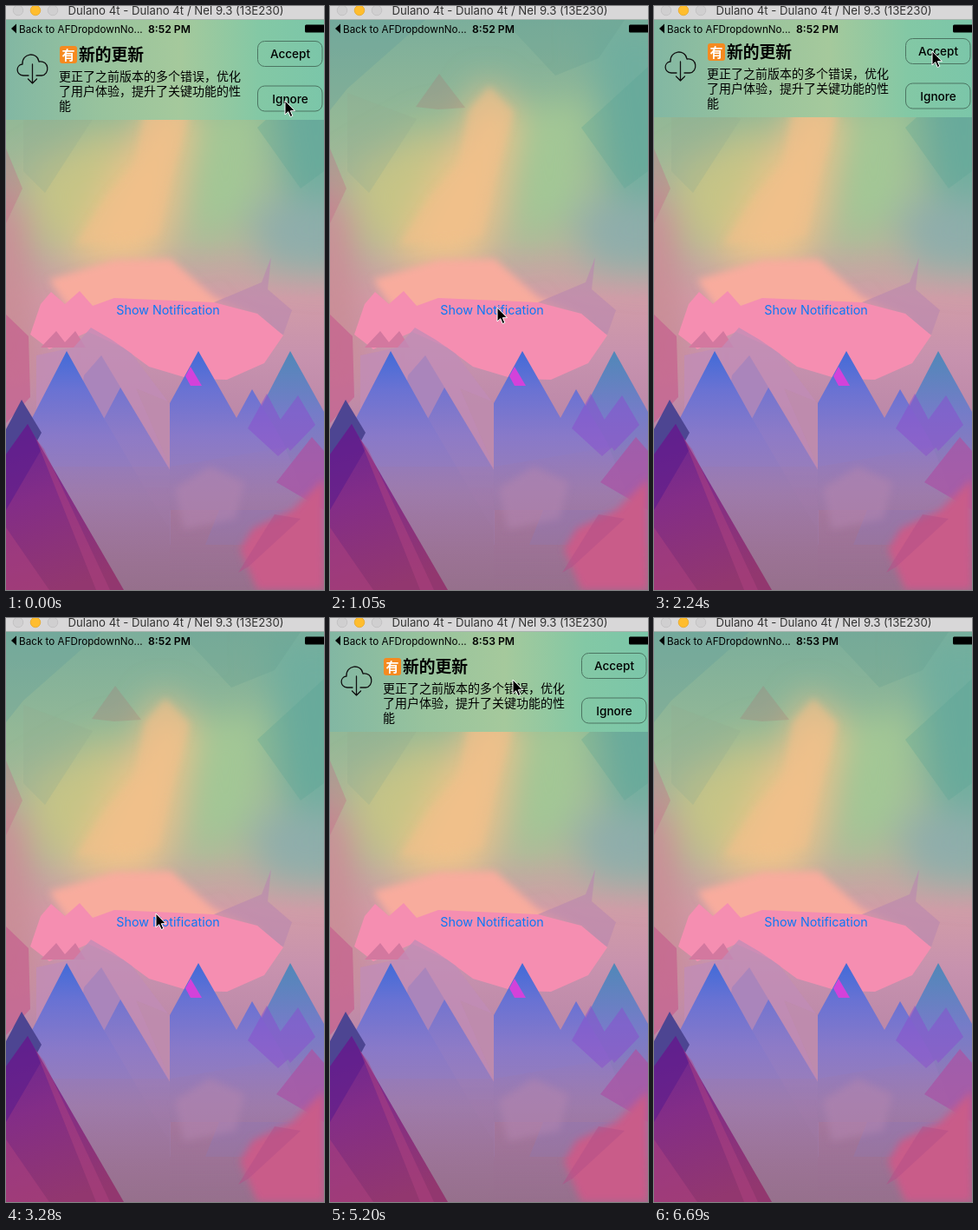
Recreate the animation shown at these times as an HTML page. Size 367x672 px, loop 6.84 s.

```html
<!DOCTYPE html>
<html lang="en">
<head>
<meta charset="utf-8">
<title>Dropdown notification</title>
<style>
  html, body { margin: 0; width: 100%; height: 100%; overflow: hidden; background: #b58fae; }
  svg { display: block; width: 100%; height: 100%; }
  text { font-family: Inter, Roboto, sans-serif; }
  .cjk { font-family: "Noto Sans CJK SC", "Noto Sans CJK", sans-serif; }
  .mid { text-anchor: middle; }
</style>
</head>
<body>
<svg viewBox="0 0 367 672">
  <defs>
    <linearGradient id="sky" x2="0" y2="1">
      <stop offset="0" stop-color="#78ad9c"/>
      <stop offset=".2" stop-color="#94b896"/>
      <stop offset=".4" stop-color="#b5b59b"/>
      <stop offset=".5" stop-color="#d19ca7"/>
      <stop offset=".6" stop-color="#c792ae"/>
      <stop offset="1" stop-color="#9b6c98"/>
    </linearGradient>
    <linearGradient id="peak" gradientUnits="userSpaceOnUse" x1="0" y1="397" x2="0" y2="640">
      <stop offset="0" stop-color="#416bd8"/>
      <stop offset=".18" stop-color="#6972d3"/>
      <stop offset=".4" stop-color="#8879c9"/>
      <stop offset=".68" stop-color="#9d7eb3"/>
      <stop offset="1" stop-color="#a1759c"/>
    </linearGradient>
    <linearGradient id="tealPeak" gradientUnits="userSpaceOnUse" x1="0" y1="397" x2="0" y2="540">
      <stop offset="0" stop-color="#5088b8"/>
      <stop offset=".5" stop-color="#757cc8"/>
      <stop offset="1" stop-color="#9379b8"/>
    </linearGradient>
    <linearGradient id="purple" gradientUnits="userSpaceOnUse" x1="0" y1="482" x2="60" y2="672">
      <stop offset="0" stop-color="#662693"/>
      <stop offset=".45" stop-color="#832d87"/>
      <stop offset="1" stop-color="#92376f"/>
    </linearGradient>
    <linearGradient id="haze" x2="0" y2="1">
      <stop offset="0" stop-color="#a478a5" stop-opacity="0"/>
      <stop offset="1" stop-color="#96708c"/>
    </linearGradient>
    <linearGradient id="glass">
      <stop offset="0" stop-color="#82b7a3"/>
      <stop offset=".3" stop-color="#98c39d"/>
      <stop offset=".55" stop-color="#a5c99c"/>
      <stop offset=".8" stop-color="#83c8a5"/>
      <stop offset="1" stop-color="#7bc6a9"/>
    </linearGradient>
    <filter id="soft" x="-50%" y="-50%" width="200%" height="200%"><feGaussianBlur stdDeviation="20"/></filter>
    <filter id="edge" x="-20%" y="-20%" width="140%" height="140%"><feGaussianBlur stdDeviation="4"/></filter>
    <clipPath id="screen"><rect y="16" width="367" height="656"/></clipPath>
  </defs>

  <g clip-path="url(#screen)">
    <!-- sky -->
    <rect width="367" height="672" fill="url(#sky)"/>
    <g filter="url(#soft)">
      <path fill="#70ae9f" d="M300 20H400V300L330 270Z"/>
      <path fill="#a3c795" d="M215 120L300 110 290 230 215 280Z"/>
      <path fill="#c6c486" d="M25 190L130 130 130 270 40 270Z"/>
      <path fill="#f3c38a" d="M180 85L215 130 195 240 170 300H70L110 230Z"/>
      <path fill="#c98d96" d="M-30 190L25 240 40 440H-30Z"/>
      <path fill="#8fadab" d="M280 230L390 220V310L300 300Z"/>
    </g>
    <g filter="url(#edge)">
      <path fill="#f1bf8a" opacity=".6" d="M184 92L212 122 190 200 175 265 80 275 115 220 150 180 160 120Z"/>
      <path fill="#f8ac9d" d="M50 315L125 292 190 291 240 335 300 362 180 365 70 345Z"/>
    </g>
    <g opacity=".28">
      <path fill="#a87878" d="M99 116L126 78 156 117 125 119Z"/>
      <path fill="#c65b86" d="M0 164L19 210 0 250Z"/>
      <path fill="#5f9c9b" d="M0 16H110L20 95 0 120Z"/>
      <path fill="#659f90" d="M200 16L260 80 310 60 340 16Z"/>
      <path fill="#56a392" d="M367 70L290 140 340 210 367 190Z"/>
      <path fill="#93ac90" d="M20 100L100 130 45 215 20 190Z"/>
    </g>
    <path fill="#b987b0" opacity=".6" d="M228 346L295 318 306 289 302 326 330 350 320 378Z"/>
    <path fill="#f58eb1" d="M28 378L40 343 52 329 68 343 85 328 100 345 125 336 240 341 290 354 320 379 298 411 255 430 212 429 165 415 135 393 95 375 50 395Z"/>
    <path fill="#c6638f" opacity=".75" d="M0 355L26 380 28 450 0 480Z"/>
    <path fill="#d3789f" d="M40 393L58 374 68 387 80 374 92 393Z"/>
    <path fill="#c18db7" opacity=".75" d="M78 393L98 370 122 384 145 400 189 458V540H35V402Z"/>

    <!-- mountains -->
    <path fill="#a484bd" opacity=".8" d="M90 425L110 402 190 535V620H60Z"/>
    <path fill="url(#peak)" d="M70 397L113 474 189 604V672H0V532Z"/>
    <path fill="url(#peak)" opacity=".85" d="M132 439L189 534V612L113 475Z"/>
    <path fill="#bd8aa9" opacity=".65" d="M150 440L189 456V530Z"/>
    <path fill="url(#tealPeak)" d="M328 397L367 467V620H230L290 470Z"/>
    <path fill="url(#peak)" d="M222 397L266 474 284 441 320 502 350 580H189V457Z"/>
    <path fill="#8951ce" opacity=".55" d="M301 446L331 503 314 518 279 486ZM337 448L357 482 328 512 310 485Z"/>
    <path fill="#d342da" d="M213 415L226 437H213L207 426Z"/>
    <path fill="url(#haze)" d="M45 530L190 530 367 500V672H45Z"/>
    <path fill="#b184af" opacity=".6" filter="url(#edge)" d="M195 555L235 530 275 548 265 590 205 602Z"/>

    <!-- foreground slopes -->
    <path fill="#4d4592" d="M18 453L41 491 20 530 0 520V487Z"/>
    <path fill="url(#purple)" d="M25 481L136 672H0V516Z"/>
    <path fill="#5a1c8c" opacity=".6" d="M25 481L41 510 0 580V516Z"/>
    <path fill="#b14380" opacity=".45" d="M34 497L44 510 120 672H104ZM0 600L50 672H0Z"/>
    <path fill="#a857a7" opacity=".8" d="M353 496L367 512V580L312 548Z"/>
    <path fill="#c95b89" d="M367 544L330 580 285 601 270 625 290 672H367Z" filter="url(#edge)"/>
    <path fill="#b34f87" opacity=".5" d="M310 585L268 652 280 645 340 590Z"/>

    <text class="mid" x="187" y="355" font-size="14.3" fill="#0b78f6">Show Notification</text>

    <g id="panel">
      <rect y="-100" width="367" height="231" fill="url(#glass)"/>
      <g fill="none" stroke="#111" stroke-width="1.3" stroke-linecap="round" stroke-linejoin="round">
        <path d="M26 80H20C11 79 11 68 19 67C18 54 36 52 38 64C50 62 51 79 41 80H35M30.5 67V89M25.5 84L30.5 89 35.5 84"/>
      </g>
      <rect x="62" y="46" width="20" height="20" rx="3" fill="#f58a20"/>
      <text class="cjk mid" x="72" y="62" font-size="15" font-weight="700" fill="#fff">有</text>
      <text class="cjk" x="84" y="63" font-size="18.8" font-weight="700">新的更新</text>
      <g class="cjk" font-size="14">
        <text class="cjk" x="61" y="85.5">更正了之前版本的多个错误，优化</text>
        <text class="cjk" x="61" y="102.5">了用户体验，提升了关键功能的性</text>
        <text class="cjk" x="61" y="119.5">能</text>
      </g>
      <g fill="none" stroke="#4c7562" stroke-width="1">
        <rect x="290.5" y="40.5" width="74.5" height="29" rx="8"/>
        <rect x="290.5" y="92" width="74.5" height="29" rx="8"/>
      </g>
      <g class="mid" font-size="13.6" font-weight="500">
        <text x="328" y="60">Accept</text>
        <text x="328" y="111.5">Ignore</text>
      </g>
    </g>

    <!-- status bar -->
    <path d="M6 26L12 20.5V31.5Z"/>
    <text x="15" y="30.5" font-size="11.7">Back to AFDropdownNo...</text>
    <text id="clock" x="164" y="30.5" font-size="12.2" font-weight="600"></text>
    <rect x="345" y="21.5" width="24" height="9" rx="1.5"/>
  </g>

  <!-- window title bar -->
  <rect width="367" height="15" fill="#d8d7d8"/>
  <rect y="15" width="367" height="1" fill="#a9b5af"/>
  <g fill="#d0cfd0" stroke="#bfbebf" stroke-width=".8">
    <circle cx="14" cy="5" r="5.8"/>
    <circle cx="34" cy="5" r="5.8" fill="#ffbd2e" stroke="#e8a82a"/>
    <circle cx="54" cy="5" r="5.8"/>
  </g>
  <text class="mid" x="196" y="10" font-size="13.2" fill="#333">Dulano 4t - Dulano 4t / Nel 9.3 (13E230)</text>

  <path id="cursor" d="M0 0V16L3.7 12.7 6.2 18.5 8.8 17.4 6.3 11.7H11.4Z" fill="#000" stroke="#fff" stroke-width="1"/>
</svg>

<script>
const LOOP = 6840, TICKS = 46, TICK = LOOP / TICKS;
const HEIGHT = 116, GRAVITY = 1000, LIFT = 1500, BOUNCE = 0.5;

// Panel events in ms: it falls and bounces once, or accelerates upwards.
const EVENTS = [
  [260, lift], [1280, drop], [2500, lift],
  [3720, drop], [5460, lift]
];

// Pointer path: tick, x, y
const PATH = [
  [0, 322, 109], [2, 322, 109], [7, 193, 347], [9, 193, 347],
  [15, 321, 52], [17, 321, 52], [20, 174, 452], [22, 173, 340],
  [25, 173, 345], [29, 298, 350], [32, 195, 30], [33, 180, 60],
  [34, 200, 94], [35, 211, 71], [37, 211, 71], [43, 291, 634], [44, 295, 617]
];

const panel = document.getElementById("panel");
const clock = document.getElementById("clock");
const cursor = document.getElementById("cursor");

function lift(s) {
  return -Math.min(HEIGHT, LIFT * s * s / 2);
}

function drop(s) {
  const landing = Math.sqrt(2 * HEIGHT / GRAVITY);
  if (s < landing) return GRAVITY * s * s / 2 - HEIGHT;
  const r = s - landing;
  return -Math.max(0, BOUNCE * GRAVITY * landing * r - GRAVITY * r * r / 2);
}

function panelOffset(ms) {
  const event = EVENTS.findLast(([start]) => ms >= start);
  return event ? event[1]((ms - event[0]) / 1000) : 0;
}

function pointerAt(tick) {
  const i = PATH.findIndex(([end]) => end >= tick);
  if (i <= 0) return PATH[0].slice(1);
  const [t0, x0, y0] = PATH[i - 1], [t1, x1, y1] = PATH[i];
  const u = (tick - t0) / (t1 - t0), k = u * u * (3 - 2 * u);
  return [x0 + (x1 - x0) * k, y0 + (y1 - y0) * k];
}

function draw(now) {
  const tick = Math.floor((now % LOOP) / TICK + 0.08) % TICKS;
  panel.setAttribute("transform", `translate(0 ${panelOffset(tick * TICK).toFixed(1)})`);
  clock.textContent = tick < 25 ? "8:52 PM" : "8:53 PM";
  cursor.setAttribute("visibility", tick < 45 ? "visible" : "hidden");
  cursor.setAttribute("transform", `translate(${pointerAt(tick)})`);
}

const start = performance.now();
function frame() {
  draw(performance.now() - start);
  requestAnimationFrame(frame);
}
frame();
</script>
</body>
</html>
```
